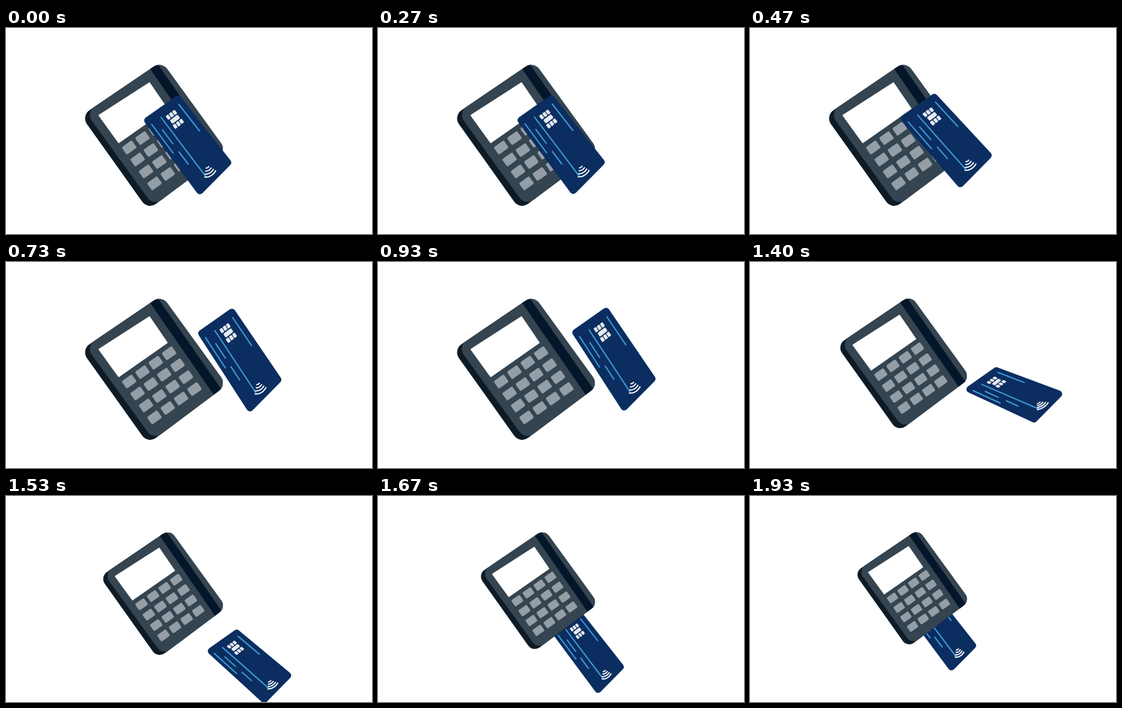
Write an HTML page with a canvas that moves like this. It is 520x293 px and loops after 1990 ms.

```html
<!DOCTYPE html>
<html lang="en">
<head>
<meta charset="utf-8">
<title>Card payment</title>
<style>
  html, body { margin: 0; width: 100%; height: 100%; overflow: hidden; background: #fff; }
  canvas { display: block; }
</style>
</head>
<body>
<canvas id="stage" width="520" height="293"></canvas>
<script>
const ctx = document.getElementById('stage').getContext('2d');
const LOOP = 1990, STEP = 200 / 3;
const BODY = '#344450', SIDE = '#0d1b27', SLOT = '#03162a', KEY = '#949ea7',
      NAVY = '#0b2d60', BLUE = '#409bd3', PALE = '#e6ebf0';

// Key poses of the card: step, centre x, centre y, turn in degrees
const poses = [
  [0, 259, 164, 47],
  [4, 261, 163.5, 47],
  [7, 279.5, 157.5, 42.5],
  [11, 333, 137, 51],
  [16, 338, 135.5, 51],
  [18, 344, 136.5, 47],
  [21, 376, 186.5, 19],
  [24, 324, 253, 44],
  [25, 299, 220.5, 47],
  [29, 273, 191, 47]
];

const secant = (k, j) =>
  (poses[k + 1][j] - poses[k][j]) / (poses[k + 1][0] - poses[k][0]);

// Tangent that never overshoots: harmonic mean, or rest at turning points
function tangent(k, j) {
  if (k === 0 || k === poses.length - 1) return 0;
  const a = secant(k - 1, j), b = secant(k, j);
  return a * b > 0 ? 2 * a * b / (a + b) : 0;
}

const smooth = x => x * x * (3 - 2 * x);

function poseAt(step) {
  let k = 0;
  while (k < poses.length - 2 && poses[k + 1][0] <= step) k++;
  const a = poses[k], b = poses[k + 1], h = b[0] - a[0], s = (step - a[0]) / h;
  return [1, 2, 3].map(j => a[j] + (b[j] - a[j]) * smooth(s)
    + h * s * (1 - s) * ((1 - s) * tangent(k, j) - s * tangent(k + 1, j)));
}

function shape(pts, color, radius = 0) {
  const n = pts.length, p = pts[n - 1], q = pts[0];
  ctx.beginPath();
  ctx.moveTo((p[0] + q[0]) / 2, (p[1] + q[1]) / 2);
  pts.forEach((c, i) => ctx.arcTo(...c, ...pts[(i + 1) % n], radius));
  ctx.closePath();
  ctx.fillStyle = color;
  ctx.fill();
}

function patch(map, u0, u1, v0, v1, color, radius) {
  shape([map(u0, v0), map(u0, v1), map(u1, v1), map(u1, v0)], color, radius);
}

function stroke(pts, color, width) {
  ctx.beginPath();
  pts.forEach(p => ctx.lineTo(...p));
  ctx.strokeStyle = color;
  ctx.lineWidth = width;
  ctx.stroke();
}

const keypad = (row, col) => [175 + 12 * row + 18.9 * col, 170 + 17 * row - 13.4 * col];

// The terminal shrinks towards a fixed point at its upper right.
function drawTerminal(scale) {
  ctx.save();
  ctx.translate(309, 48);
  ctx.scale(scale, scale);
  ctx.translate(-309, -48);
  const top = [221, 47.3], right = [313.5, 175];
  shape([[106.7, 125], top, right, [201.8, 258.7]], SIDE, 14);
  shape([[113.5, 120.4], top, right, [209.5, 253]], BODY, 14);
  ctx.save();
  ctx.clip();
  shape([[204, 57], [214, 49], [306, 181], [296, 190]], SLOT);
  ctx.restore();
  shape([[131, 124], [204, 77], [230, 115], [160, 164]], '#fff', 1);
  for (let row = 0; row < 4; row++)
    for (let col = 0; col < 4; col++)
      patch(keypad, row - .31, row + .31, col - .38, col + .38, KEY, 2);
  ctx.restore();
}

// Card plane: u runs along the card, v across it; it tapers slightly with u.
function cardPlane(step, scale) {
  const [x, y, deg] = poseAt(step), turn = deg * Math.PI / 180;
  return (u, v) => {
    u -= .5;
    v -= .5;
    return [
      x + scale * (u * 113 * Math.cos(turn) + v * (47 - 4 * u)),
      y + scale * (u * 138 * Math.sin(turn) - v * (40 + 11 * u))
    ];
  };
}

// Stripes: v, then u from and to
const stripes = [[.085, .08, .48], [.36, .08, .91], [.88, .08, .48], [.21, .2, .4], [.21, .5, .68]];

function drawCard(step, scale) {
  const map = cardPlane(step, scale);
  patch(map, -.01, 1.01, -.02, 1.02, NAVY, 5);
  for (const [v, from, to] of stripes) stroke([map(from, v), map(to, v)], BLUE, 1.8);
  for (let i = 0; i < 3; i++) {
    const v = .46 + i * .094;
    patch(map, .105, .157, v, v + .076, PALE, 1);
    patch(map, .233, .285, v, v + .076, PALE, 1);
  }
  patch(map, .17, .22, .48, .71, PALE, 1.5);
  for (let r = 5; r < 18; r += 4) {
    const arc = [];
    for (let a = -.85; a < .4; a += .12)
      arc.push(map(.81 + r * Math.cos(a) / 127, .53 + r * Math.sin(a) / 62));
    stroke(arc, '#fff', 1.7);
  }
}

function draw(now) {
  const step = Math.min(29, Math.floor((now % LOOP + 4) / STEP));
  const progress = Math.min(1, Math.max(0, (step - 17) / 11.5));
  const scale = 1 - .205 * smooth(progress ** .8);
  const inFront = step <= 21;
  ctx.fillStyle = '#fff';
  ctx.fillRect(0, 0, 520, 293);
  if (!inFront) drawCard(step, scale);
  drawTerminal(scale);
  if (inFront) drawCard(step, scale);
}

const start = performance.now();
function tick() {
  draw(performance.now() - start);
  requestAnimationFrame(tick);
}
tick();
</script>
</body>
</html>
```
